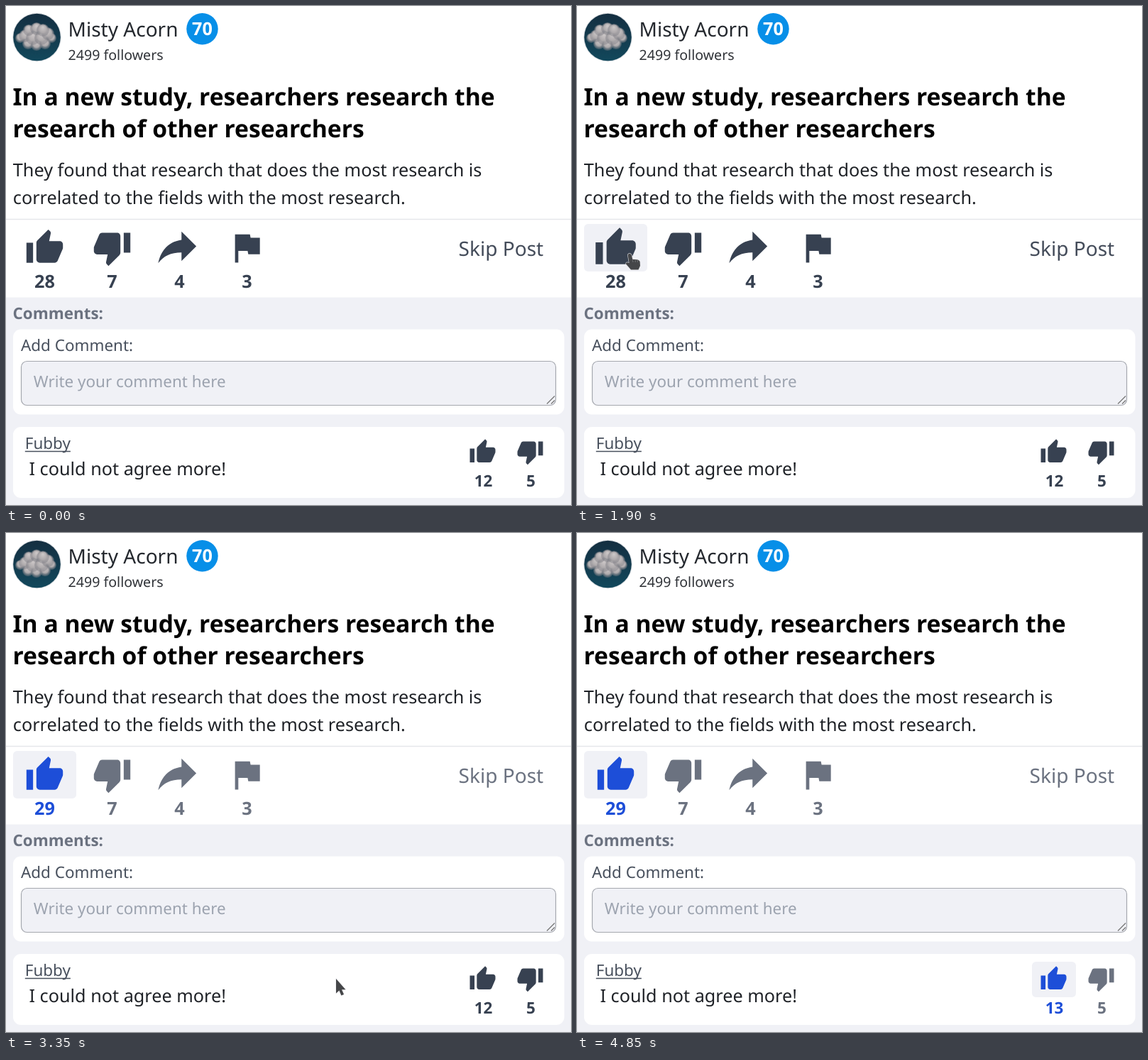
Animation of 796 by 703 pixels, one loop 6150 ms. Source, as an HTML page with a canvas:

```html
<!DOCTYPE html>
<html lang="en">
<head>
<meta charset="utf-8">
<title>Post</title>
<style>
  html, body { margin: 0; width: 100%; height: 100%; overflow: hidden; background: #fff; }
  canvas { display: block; }
</style>
</head>
<body>
<canvas id="stage" width="796" height="703"></canvas>
<script>
const ctx = document.getElementById('stage').getContext('2d');
const LOOP = 6150, STEP = 50, FADE = 150;
const U = 1.402; // layout pixels per CSS pixel

const INK = [55, 65, 81], DIM = [107, 114, 128], BLUE = [29, 78, 216], SOFT = [68, 76, 90];
const PANEL = '#f0f1f6', BODY = '#1f2227', LABEL = '#48505d';

const UP = new Path2D('M1 21h4V9H1v12zm22-11c0-1.1-.9-2-2-2h-6.31l.95-4.57.03-.32c0-.41-.17-.79-.44-1.06L14.17 1 7.59 7.59C7.22 7.95 7 8.45 7 9v10c0 1.1.9 2 2 2h9c.83 0 1.54-.5 1.84-1.22l3.02-7.05c.09-.23.14-.47.14-.73v-2z');
const DOWN = new Path2D('M15 3H6c-.83 0-1.54.5-1.84 1.22l-3.02 7.05c-.09.23-.14.47-.14.73v2c0 1.1.9 2 2 2h6.31l-.95 4.57-.03.32c0 .41.17.79.44 1.06L9.83 23l6.59-6.59c.36-.36.58-.86.58-1.41V5c0-1.1-.9-2-2-2zm4 0v12h4V3h-4z');
const SHARE = new Path2D('M21 12L14 5V9C7 10 4 15 3 20C5.5 16.5 9 14.9 14 14.9V19L21 12Z');
const FLAG = new Path2D('M14.4 6L14 4H5v17h2v-7h5.6l.4 2h7V6z');
const ARROW = new Path2D('M0 0V20.5L4.4 16.6L7.4 23.6L11 22L8 15.2H13.4Z');
const HAND = new Path2D('M-3.4 1.5Q-1-2 1.6 1.5L3.4 8Q12.4 7.4 13.6 11L14 17L11.5 22.5H1L-6 14.5Q-6.4 11-1.4 13Z');

const postBox = { x: 10, y: 307, w: 89, h: 67 };
const noteBox = { x: 641, y: 604, w: 62, h: 50 };
const field = { x: 21.5, y: 500.5, w: 753, h: 62 };

// pointer path: time, x, y
const keys = [
  [1450, 10.8, 456.5], [1600, 36, 402], [1750, 64, 360], [1900, 75, 349],
  [2000, 76, 347], [2450, 76, 347], [2600, 96, 367], [2750, 126, 411],
  [3000, 217, 518], [3350, 465, 628], [3700, 648, 642], [3900, 693, 642],
  [4100, 690, 634], [4350, 690, 634], [4500, 692, 650], [4800, 700, 706]
];
const postLike = 2100, noteLike = 4300;
const postHover = [1680, 2650], noteHover = [3700, 4510];

const clamp = v => Math.max(0, Math.min(1, v));
const ramp = (t, from) => clamp((t - from) / FADE);
const hoverAt = (t, [from, to]) => ramp(t, from) - ramp(t, to);
const mix = (a, b, k) => `rgb(${a.map((v, i) => Math.round(v + (b[i] - v) * k)).join()})`;
const inside = (b, [x, y]) => x >= b.x && x <= b.x + b.w && y >= b.y && y <= b.y + b.h;

// monotone cubic through the keys
function slope(i, d) {
  if (i <= 0 || i >= keys.length - 1) return 0;
  const part = j => (keys[j + 1][d] - keys[j][d]) / (keys[j + 1][0] - keys[j][0]);
  const a = part(i - 1), b = part(i);
  return a * b > 0 ? 2 * a * b / (a + b) : 0;
}

function pointerAt(t) {
  let i = 0;
  while (i < keys.length - 2 && t >= keys[i + 1][0]) i++;
  const p = keys[i], q = keys[i + 1], span = q[0] - p[0];
  const u = clamp((t - p[0]) / span), u2 = u * u, u3 = u2 * u;
  return [1, 2].map(d =>
    p[d] * (2 * u3 - 3 * u2 + 1) + q[d] * (3 * u2 - 2 * u3) +
    span * (slope(i, d) * (u3 - 2 * u2 + u) + slope(i + 1, d) * (u3 - u2)));
}

function text(str, x, y, size, color, weight = 400, align = 'left') {
  ctx.font = `${weight} ${size * U}px "Noto Sans", "Open Sans", sans-serif`;
  ctx.textAlign = align;
  ctx.fillStyle = color;
  ctx.fillText(str, x, y);
}

function box(b, radius, fill, stroke) {
  ctx.beginPath();
  ctx.roundRect(b.x, b.y, b.w, b.h, radius);
  ctx.fillStyle = fill;
  ctx.fill();
  if (stroke) {
    ctx.strokeStyle = stroke;
    ctx.lineWidth = 1.2;
    ctx.stroke();
  }
}

function disc(x, y, r, fill) {
  ctx.beginPath();
  ctx.arc(x, y, r, 0, 7);
  ctx.fillStyle = fill;
  ctx.fill();
}

function icon(path, x, y, size, color) {
  ctx.save();
  ctx.translate(x, y);
  ctx.scale(size * U / 24, size * U / 24);
  ctx.translate(-12, -12);
  ctx.fillStyle = color;
  ctx.fill(path);
  ctx.restore();
}

function line(x1, y1, x2, y2, color, width) {
  ctx.beginPath();
  ctx.moveTo(x1, y1);
  ctx.lineTo(x2, y2);
  ctx.strokeStyle = color;
  ctx.lineWidth = width;
  ctx.stroke();
}

// cloud lump, lit from above
function puff(x, y, r) {
  const shade = ctx.createRadialGradient(x, y - r * .5, 0, x, y, r);
  shade.addColorStop(0, '#cfcaca');
  shade.addColorStop(.6, '#aeaaac');
  shade.addColorStop(1, 'rgba(120,120,128,.35)');
  disc(x, y, r, shade);
}

function avatar() {
  disc(43.5, 44, 34.2, '#d5d9dd');
  ctx.save();
  ctx.beginPath();
  ctx.arc(43.5, 44, 33.3, 0, 7);
  ctx.clip();
  const sky = ctx.createLinearGradient(0, 10, 0, 78);
  sky.addColorStop(0, '#142e40');
  sky.addColorStop(1, '#12485c');
  ctx.fillStyle = sky;
  ctx.fillRect(9, 9, 70, 70);
  const puffs = [[31, 53, 8], [43, 55, 8], [55, 53, 8], [20, 45, 7], [64, 45, 7],
                 [27, 42, 9], [38, 45, 10], [50, 45, 10], [59, 39, 9],
                 [32, 34, 8], [43, 32, 9], [52, 34, 9]];
  puffs.forEach(p => puff(...p));
  ctx.restore();
}

function header() {
  avatar();
  text('Misty Acorn', 87.5, 43, 20, '#24282e');
  text('2499 followers', 87.5, 76, 14, '#303338');
  disc(276.5, 32.2, 22.2, '#078fe8');
  text('70', 276.5, 41, 18, '#fff', 600, 'center');
  text('In a new study, researchers research the', 9.5, 140, 24, '#000', 700);
  text('research of other researchers', 9.5, 184.7, 24, '#000', 700);
  text('They found that research that does the most research is', 9.8, 239.5, 18, BODY);
  text('correlated to the fields with the most research.', 9.8, 278.5, 18, BODY);
  line(0, 300.5, 796, 300.5, '#e5e7eb', 1.3);
}

function actions(t) {
  const liked = ramp(t, postLike), hover = hoverAt(t, postHover);
  const main = mix(INK, BLUE, liked), rest = mix(INK, DIM, liked);
  ctx.globalAlpha = Math.max(hover, liked);
  box(postBox, 5.6, PANEL);
  ctx.globalAlpha = 1;
  icon(UP, 54.5, 340.6, 40 * (1 + .1 * hover), main);
  icon(DOWN, 149.5, 340.6, 40, rest);
  icon(SHARE, 241.3, 338.5, 51, rest);
  icon(FLAG, 339, 340.4, 40, rest);
  const counts = [t >= postLike ? 29 : 28, 7, 4, 3];
  counts.forEach((n, i) => text(n, 54.5 + 95 * i, 397, 18, i ? rest : main, 700, 'center'));
  text('Skip Post', 637.6, 352.3, 20, mix(SOFT, DIM, liked));
}

function comments(t) {
  ctx.fillStyle = PANEL;
  ctx.fillRect(0, 410.5, 796, 293);
  text('Comments:', 9.5, 441, 16, mix(DIM, DIM, 0), 700);

  box({ x: 10, y: 455.5, w: 776.5, h: 120 }, 11, '#fff');
  text('Add Comment:', 21, 485.5, 16, LABEL);
  box(field, 8, PANEL, '#a5a8af');
  text('Write your comment here', 38.8, 537, 16, '#9ca3af');
  line(762, 560.5, 773, 549.5, '#777', 1.2);
  line(768, 560.5, 773, 555.5, '#777', 1.2);

  box({ x: 10, y: 593, w: 776.5, h: 100 }, 11, '#fff');
  text('Fubby', 26.8, 624, 16, LABEL);
  line(26.8, 627.5, 26.8 + ctx.measureText('Fubby').width, 627.5, LABEL, 1.3);
  text('I could not agree more!', 32.5, 660.7, 18, BODY);

  const liked = ramp(t, noteLike), hover = hoverAt(t, noteHover);
  const main = mix(INK, BLUE, liked), rest = mix(INK, DIM, liked);
  ctx.globalAlpha = Math.max(hover, liked);
  box(noteBox, 5.6, PANEL);
  ctx.globalAlpha = 1;
  icon(UP, 671.5, 628.3, 28 * (1 + .1 * hover), main);
  icon(DOWN, 738.5, 628.3, 28, rest);
  text(t >= noteLike ? 13 : 12, 672.5, 676.5, 16, main, 700, 'center');
  text(5, 739.5, 676.5, 16, rest, 700, 'center');
}

function pointer(t) {
  if (t < keys[0][0] || t > keys[keys.length - 1][0]) return;
  const at = pointerAt(t);
  ctx.save();
  ctx.translate(at[0], at[1]);
  if (inside(field, at)) {
    line(0, -9, 0, 9, '#70747b', 1.4);
    line(-4, -9.5, 4, -9.5, '#70747b', 1.4);
    line(-4, 9.5, 4, 9.5, '#70747b', 1.4);
  } else {
    const shape = inside(postBox, at) || inside(noteBox, at) ? HAND : ARROW;
    ctx.lineWidth = 1.4;
    ctx.lineJoin = 'round';
    ctx.strokeStyle = 'rgba(235,235,238,.8)';
    ctx.stroke(shape);
    ctx.fillStyle = '#454649';
    ctx.fill(shape);
    if (shape === HAND) {
      for (const x of [3.4, 7, 10.2]) line(x, 8.5, x + .4, 12, '#77787c', .8);
    }
  }
  ctx.restore();
}

function draw(t) {
  ctx.textRendering = 'geometricPrecision';
  ctx.fillStyle = '#fff';
  ctx.fillRect(0, 0, 796, 703);
  header();
  actions(t);
  comments(t);
  pointer(t);
}

const start = performance.now();
function frame(now) {
  const t = Math.max(0, now - start) % LOOP;
  draw(Math.floor(t / STEP) * STEP);
  requestAnimationFrame(frame);
}
draw(0);
requestAnimationFrame(frame);
</script>
</body>
</html>
```
